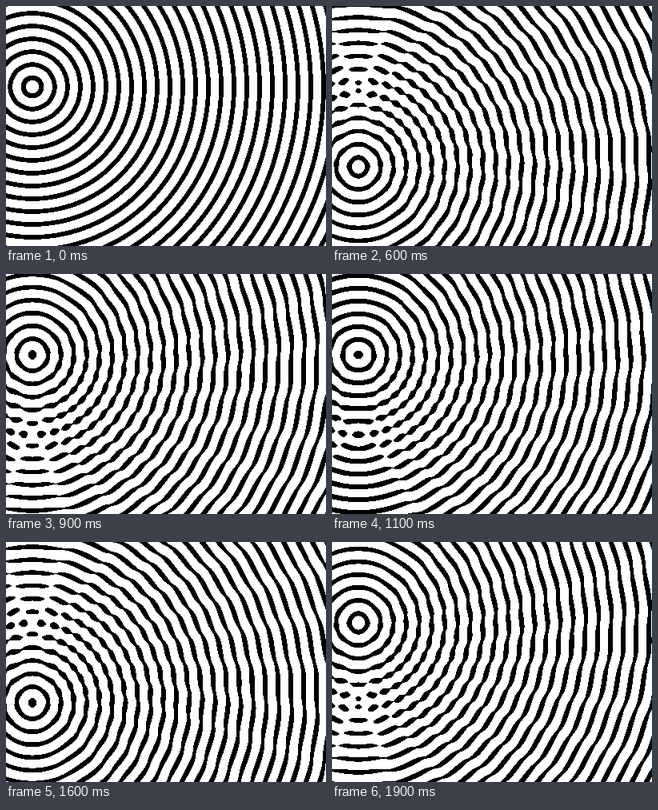
An HTML page with a canvas for the animation above (2000 ms loop, 400 by 300 pixels).

```html
<!DOCTYPE html>
<html lang="en">
<head>
<meta charset="utf-8">
<title>Two-source interference</title>
<style>
  html, body { margin: 0; width: 100%; height: 100%; overflow: hidden; background: #fff; }
  canvas { display: block; width: 400px; height: 300px; }
</style>
</head>
<body>
<canvas id="stage" width="400" height="300"></canvas>
<script>
const W = 400, H = 300;
const LOOP = 2000, STEP = 100;
const WAVELENGTH = 16;
const LIFT = 4;        // height of the sources above the plane
const CUTOFF = 0.43;   // share of the local amplitude that turns black

const ctx = document.getElementById('stage').getContext('2d');
const image = ctx.createImageData(W, H);
const pixels = new Uint32Array(image.data.buffer);
const BLACK = 0xff000000, WHITE = 0xffffffff;

// Wave height and amplitude of one source at every pixel.
function makeSource(cx, cy) {
  const wave = new Float32Array(W * H);
  const amp = new Float32Array(W * H);
  for (let y = 0, i = 0; y < H; y++) {
    for (let x = 0; x < W; x++, i++) {
      const r = Math.hypot(x - cx, y - cy, LIFT);
      amp[i] = 1 / Math.sqrt(r);
      wave[i] = amp[i] * Math.sin(2 * Math.PI * r / WAVELENGTH);
    }
  }
  return { wave, amp };
}

const upper = makeSource(32.5, 100.5);
const lower = makeSource(32.5, 200.5);

function draw(time) {
  const angle = 2 * Math.PI * time / LOOP;
  const a = Math.cos(angle), b = Math.sin(angle);
  for (let i = 0; i < pixels.length; i++) {
    const height = a * upper.wave[i] + b * lower.wave[i];
    const envelope = Math.hypot(a * upper.amp[i], b * lower.amp[i]);
    pixels[i] = height < -CUTOFF * envelope ? BLACK : WHITE;
  }
  ctx.putImageData(image, 0, 0);
}

const start = performance.now();
let shown = -1;

function tick() {
  const elapsed = Math.max(0, performance.now() - start) % LOOP;
  const step = Math.floor(elapsed / STEP);
  if (step !== shown) {
    shown = step;
    draw(step * STEP);
  }
  requestAnimationFrame(tick);
}
tick();
</script>
</body>
</html>
```
